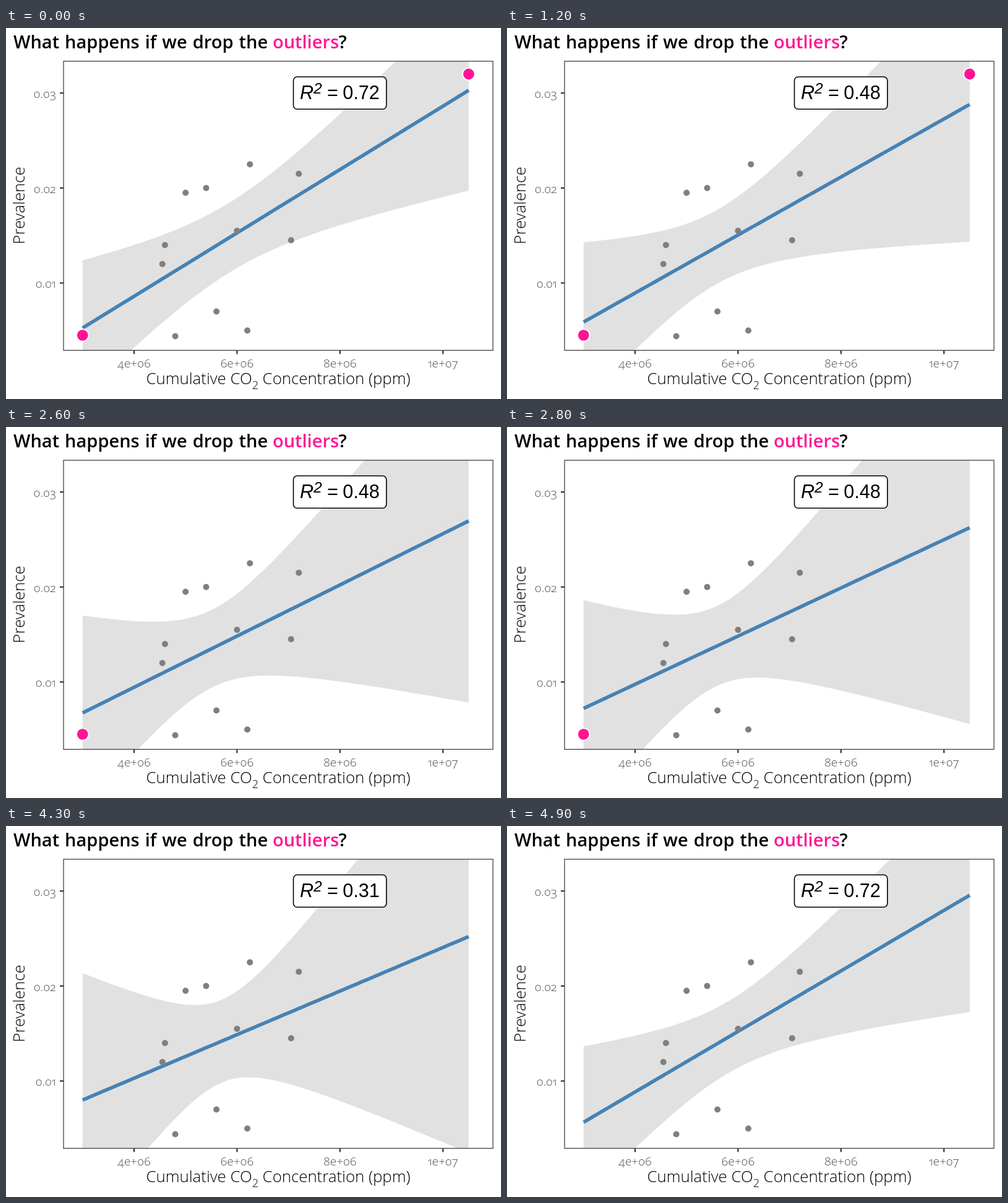
Write an HTML page that moves like this. It is 800 px wide and 600 px high and loops after 7 s.

```html
<!DOCTYPE html>
<html lang="en">
<head>
<meta charset="utf-8">
<title>Dropping outliers</title>
<style>
  html, body { margin: 0; width: 100%; height: 100%; overflow: hidden; background: #fff; }
  svg { display: block; width: 800px; height: 600px; font-family: "Open Sans", "Noto Sans", sans-serif; }
  .title { font-size: 29px; font-weight: 600; word-spacing: 1.5px; }
  .axis { font-size: 25.8px; font-weight: 300; text-anchor: middle; }
  .ticks text { font-size: 19px; font-weight: 300; fill: #4d4d4d; font-variant-numeric: oldstyle-nums; }
  .ticks path { stroke: #333; stroke-width: 2.2; }
  .label { font: 30.5px "Liberation Sans", Arial, sans-serif; }
  .pink { fill: #ff1493; }
  .outlier { fill: #ff1493; stroke: #fff; stroke-width: 1.8; }
</style>
</head>
<body>
<svg viewBox="0 0 800 600">
  <clipPath id="panel"><rect x="93" y="53.7" width="694" height="467.6"/></clipPath>
  <text class="title" y="33"><tspan x="12">What happens if we drop the</tspan><tspan x="431" class="pink">outliers</tspan><tspan x="537.5">?</tspan></text>
  <g clip-path="url(#panel)">
    <path id="band" fill="#e1e1e1"/>
    <path id="line" fill="none" stroke="#4682b4" stroke-width="5.7"/>
    <g id="dots" fill="#7f7f7f"></g>
  </g>
  <rect x="464.5" y="79" width="150.3" height="52.2" rx="6" fill="#fff" stroke="#000" stroke-width="1.6"/>
  <g class="label">
    <text x="475" y="115" font-style="italic">R<tspan x="497" y="106" font-size="24.5">2</tspan></text>
    <text x="519" y="115">=</text>
    <text id="value" x="544.3" y="115"></text>
  </g>
  <rect x="93" y="53.7" width="694" height="467.6" fill="none" stroke="#333" stroke-width="1.2"/>
  <g id="ticks" class="ticks"></g>
  <text class="axis" x="440" y="576">Cumulative CO<tspan dy="8" font-size="18">2</tspan><tspan dy="-8"> Concentration (ppm)</tspan></text>
  <text class="axis" transform="translate(30 287) rotate(-90)">Prevalence</text>
</svg>
<script>
const $ = id => document.getElementById(id);

// x in millions of ppm, y in thousandths
const px = x => 207 + (x - 4) * 83.2;
const py = y => 412.4 - (y - 10) * 15.36;
const points = [
  [4.55, 12], [4.6, 14], [4.8, 4.4], [5, 19.5], [5.4, 20], [5.6, 7],
  [6, 15.5], [6.2, 5], [6.25, 22.5], [7.05, 14.5], [7.2, 21.5]
];
const low = [3, 4.5], high = [10.5, 32];
const xs = Array.from({ length: 80 }, (_, i) => 3 + 7.5 * i / 79);

// Least squares fit with its 95% confidence band; t is the Student quantile
function fit(data, t) {
  const n = data.length;
  const sum = f => data.reduce((s, p) => s + f(...p), 0);
  const mx = sum(x => x) / n, my = sum((x, y) => y) / n;
  const sxx = sum(x => (x - mx) ** 2);
  const slope = sum((x, y) => (x - mx) * (y - my)) / sxx;
  const at = x => my + slope * (x - mx);
  const sigma = Math.sqrt(sum((x, y) => (y - at(x)) ** 2) / (n - 2));
  return xs.map(x => {
    const half = t * sigma * Math.sqrt(1 / n + (x - mx) ** 2 / sxx);
    return [at(x), at(x) - half, at(x) + half];
  });
}

const fits = [
  fit([...points, low, high], 2.200985),
  fit([...points, low], 2.228139),
  fit(points, 2.262157)
];
const values = ["0.72", "0.48", "0.31"];

const circle = ([x, y], attrs) => `<circle cx="${px(x)}" cy="${py(y)}" ${attrs}/>`;
$("dots").innerHTML = points.map(p => circle(p, 'r="5"')).join("") +
  circle(low, 'id="low" class="outlier" r="9.8"') +
  circle(high, 'id="high" class="outlier" r="9.8"');

$("ticks").innerHTML =
  [10, 20, 30].map(y => `<path d="M87 ${py(y)}H93"/>
    <text x="80.5" y="${py(y) + 8}" text-anchor="end">${(y / 1000).toFixed(2)}</text>`).join("") +
  [4, 6, 8, 10].map(x => `<path d="M${px(x)} 521.3v6"/>
    <text x="${px(x)}" y="548.5" text-anchor="middle">${x < 10 ? x + "e+06" : "1e+07"}</text>`).join("");

const show = (id, on) => $(id).setAttribute("visibility", on ? "visible" : "hidden");

function draw(now) {
  const t = now % 7000;
  const from = t < 2600 ? 0 : t < 4300 ? 1 : 2;
  const to = (from + 1) % 3;
  const step = Math.floor((t - 900 - 1700 * from) / 100) + 1;
  const f = Math.max(0, Math.min(step, from === 2 ? 7 : 8)) / 8;

  const curve = k => xs.map((x, i) => {
    const a = fits[from][i][k], b = fits[to][i][k];
    return `${px(x).toFixed(2)} ${py(a + (b - a) * f).toFixed(2)}`;
  });
  $("line").setAttribute("d", "M" + curve(0).join("L"));
  $("band").setAttribute("d", "M" + [...curve(2), ...curve(1).reverse()].join("L") + "Z");
  $("value").textContent = values[f < 0.5 ? from : to];
  show("high", from === 0 && f < 1);
  show("low", from === 0 || (from === 1 && f < 1));
}

let start;
function tick(now) {
  start ??= now;
  draw(now - start);
  requestAnimationFrame(tick);
}
draw(0);
requestAnimationFrame(tick);
</script>
</body>
</html>
```
